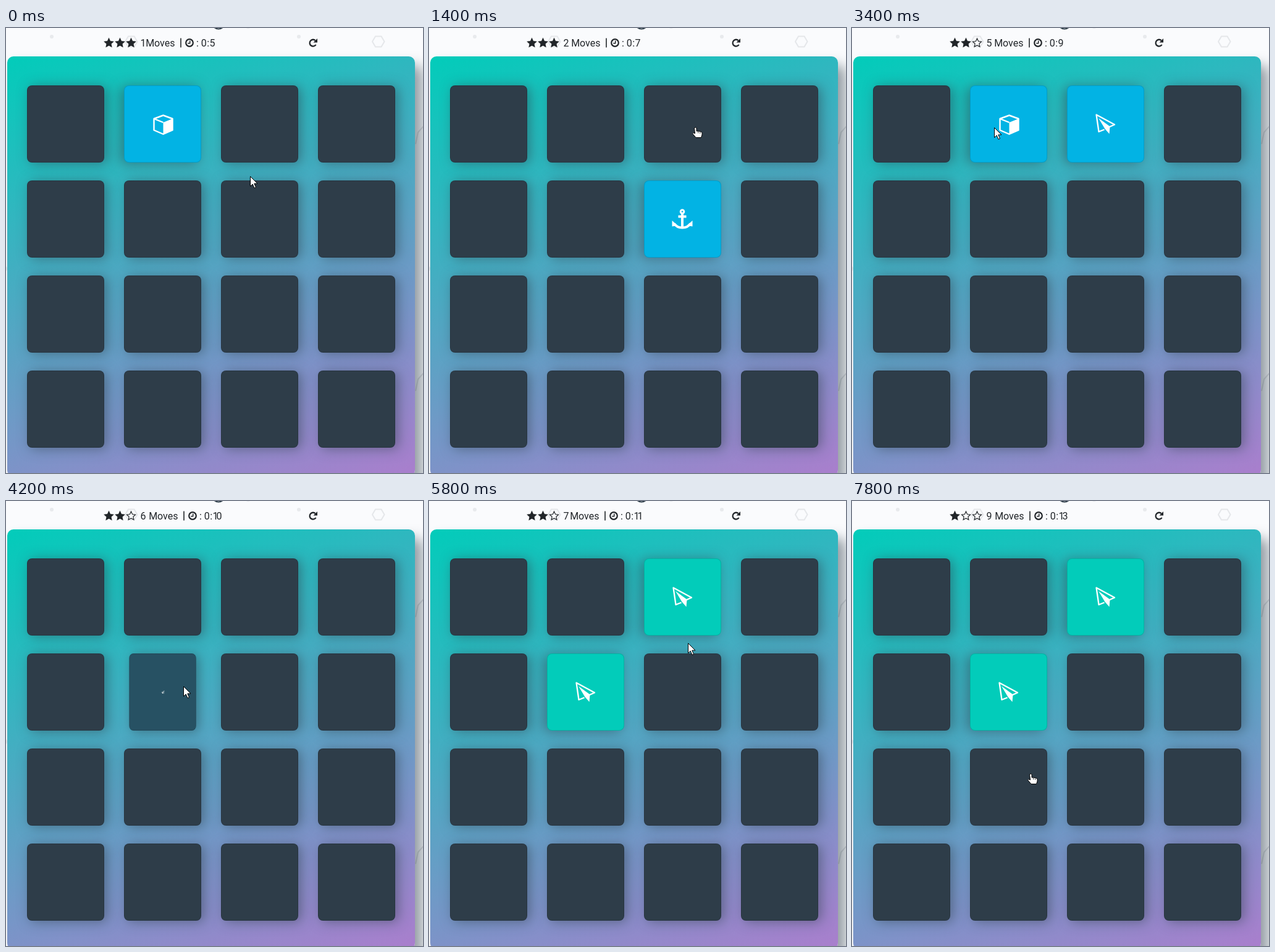
Recreate the animation shown at these times as an HTML page. Size 675 px wide and 721 px high, loop 8 s.

```html
<!DOCTYPE html>
<html lang="en">
<head>
<meta charset="utf-8">
<title>Memory game</title>
<style>
html, body { margin: 0; width: 100%; height: 100%; overflow: hidden; background: #fafbfd; }
body { position: relative; }
.layer { position: absolute; left: 0; top: 0; }
.deck {
  position: absolute; left: 2px; top: 46px; width: 660px; height: 680px; border-radius: 10px;
  background: linear-gradient(160deg, #02ccba 0%, #aa7ecd 100%);
  box-shadow: 12px 15px 20px 0 rgba(46, 61, 73, .5);
}
.card {
  position: absolute; width: 125px; height: 125px; box-sizing: border-box;
  display: flex; align-items: center; justify-content: center;
  border: 1px solid rgba(0, 0, 0, .125); border-radius: 8px; background: #2e3d49;
  box-shadow: 5px 2px 20px 0 rgba(46, 61, 73, .5);
}
.card svg { flex: none; overflow: visible; }
text { font: 16px Roboto, "Open Sans", sans-serif; fill: #212529; }
</style>
</head>
<body>
<svg class="layer" width="675" height="721" fill="none" stroke="#e5e7ea" stroke-width="2">
  <path id="hex" d="M593 22l5-8.5h9.500l5 8.500-5 8.500h-9.500z"/>
  <use href="#hex" x="-400"/>
  <g fill="#e8eaed" stroke="none">
    <circle cx="74" cy="14" r="3"/><circle cx="474" cy="14" r="3"/>
    <circle cx="392" cy="-3" r="4"/><circle cx="-3" cy="390" r="5"/>
  </g>
  <path d="M663 188L667 169 676 159M663 588L667 569 676 559" stroke="#dcdfe2"/>
  <path d="M337-1Q344 4 351-1" stroke="#2e3d49"/>
</svg>
<div class="deck" id="deck"></div>
<svg class="layer" width="675" height="721">
  <g id="header"></g>
  <path d="M500.800 20.300A5.400 5.400 0 1 0 501.600 27" fill="none" stroke="#212529" stroke-width="2.300"/>
  <path d="M504 17v6.500h-6.500z" fill="#212529"/>
  <g id="arrow" fill="#fff" stroke="#000" stroke-linejoin="round">
    <path d="M.5 .5V16.500L4.200 13 7 19.300 9.500 18.200 6.800 12H12z"/>
  </g>
  <g id="hand" fill="#fff" stroke="#000" stroke-linejoin="round">
    <path d="M-1.500 1Q.5-1 2 1V6Q9 6 11 8.500V12L9.500 16.500H1L-4.500 10Q-3.500 7.500-.5 10z"/>
    <path d="M4.800 7V9.500M7.800 7.500V10" stroke-width=".8"/>
  </g>
</svg>
<script>
const INK = '#212529', BLUE = '#02b3e4', TEAL = '#02ccba', DARK = '#2e3d49';
const $ = id => document.getElementById(id);

// Icons are seen mirrored once a card has turned over.
const cube = `<g transform="translate(-1.5 .5)"><path d="M0-15L15-9.500V9L0 15.500-15 9V-9.500z M0-3.500L15-9.500"
  fill="none" stroke="#fff" stroke-width="2.400" stroke-linejoin="round"/><path d="M-15-9.500L0-3.500V15.500L-15 9z"/></g>`;
const plane = `<path d="M-6 4.500L-15 .5 14.500-15.500 10.500 12 1.500 8.500" fill="none" stroke="#fff"
  stroke-width="2.300" stroke-linejoin="round"/><path d="M11-10L-7.500 3.500-6.500 15.500 .5 7.500z"/>`;
const anchor = `<g fill="none" stroke="#fff" stroke-width="4"><circle cy="-12.500" r="2.800" stroke-width="3"/>
  <path d="M0-9V14M-6.500-4.500H6.500M-13 7Q-9 13.500 0 13.500 9 13.500 13 7"/></g>
  <path d="M-16.500 2V11.500L-7.500 10zM16.500 2V11.500L7.500 10z"/>`;
const leaf = `<path d="M15.500-14C19-4 17 10 3 10-4 10-8 8-11 9-13 11-14 13-15 12-19 11-14 8-12 5-13-2-8-8 4-8.500 10-9 13-10 15.500-14z"/>
  <path d="M6-4.500Q-2-4-8 3" fill="none" stroke="${BLUE}" stroke-width="2.200" stroke-linecap="round"/>`;
const faces = { 1: cube, 2: plane, 4: leaf, 5: plane, 6: anchor };

const cards = Array.from({ length: 16 }, (_, i) => {
  const x = 32 + i % 4 * 157, y = 47 + (i >> 2) * 154;
  const el = document.createElement('div');
  el.className = 'card';
  el.style.left = x + 'px';
  el.style.top = y + 'px';
  el.innerHTML = `<svg width="36" height="36" viewBox="-18 -18 36 36" fill="#fff">${faces[i] || ''}</svg>`;
  $('deck').append(el);
  return { el, icon: el.firstChild, x: x + 2, y: y + 46 };
});

const STEP = 100, LOOP = 8000;
const up = [1 / 6, .4, 5 / 6, 1], down = [.7, .3, 0];

// [time, cards, how far open at each step]
const flips = [
  [0, [1], [1]], [700, [6], up], [1200, [1], down], [1600, [2, 6], down],
  [3400, [1, 2], [1]], [3800, [1, 2], down], [4200, [5], [1 / 6, ...up]],
  [5200, [2], up.slice(1)], [6300, [4], up], [7000, [6], up.slice(1)], [7300, [4, 6], [.4, 0]]
];
const matched = [2, 5], matchTime = 5400;

// [first step, last step, x, y]
const moves = [
  [100, 300, 424, 281], [1200, 1400, 431, 161], [2200, 2300, 230, 161], [3600, 4000, 287, 300],
  [4700, 5000, 389, 149], [5200, 5400, 424, 227], [5800, 5800, 419, 230], [5900, 6000, 159, 315],
  [6200, 6300, 110, 312], [6500, 6600, 335, 322], [6800, 6900, 382, 326], [7300, 7400, 380, 332],
  [7600, 7800, 289, 442]
];

// [time, moves, stars, seconds]
const scores = [
  [0, 1, 3, 5], [200, 1, 3, 6], [700, 2, 3, 6], [1200, 2, 3, 7], [1600, 3, 2, 7], [2200, 3, 2, 8],
  [3400, 5, 2, 9], [4200, 6, 2, 10], [5200, 7, 2, 11], [6300, 8, 2, 11], [7000, 9, 1, 12], [7300, 9, 1, 13]
];

function star(x, solid) {
  const points = Array.from({ length: 10 }, (_, i) => {
    const a = i * Math.PI / 5, r = (i % 2 ? .48 : 1) * 7.4;
    return [x + r * Math.sin(a), 24.4 - r * Math.cos(a)].map(v => v.toFixed(2));
  });
  return `<polygon points="${points.join(' ')}" fill="${solid ? INK : 'none'}" stroke="${INK}" stroke-width="1.2"/>`;
}

// The digit 1 is set narrower than the others.
function clockText(str, x) {
  const advance = { ':': 4.2, ' ': 3.6, 1: 6 };
  const xs = [...str].map(c => {
    const at = x;
    x += advance[c] || 9.5;
    return at;
  });
  return `<text y="30" xml:space="preserve" x="${xs.join(' ')}">${str}</text>`;
}

function header([, count, stars, seconds]) {
  const bar = { 1: 283, 7: 285, 6: 288, 8: 288, 9: 288 }[count] || 287;
  return [166.5, 184.5, 202.5].map((x, i) => star(x, i < stars)).join('') +
    `<text x="217.5" y="30">${count}</text><text x="${bar - 9.5}" y="30" text-anchor="end">Moves</text>
    <rect x="${bar - .8}" y="16.500" width="1.600" height="15" fill="${INK}"/>
    <g transform="translate(${bar + 14} 24)" fill="none" stroke="${INK}">
    <circle r="5.800" stroke-width="2.200"/><path d="M.7-3.500V.8H-2.800" stroke-width="1.500"/></g>` +
    clockText(': 0:' + seconds, bar + 25);
}

function pointer(t) {
  let x = 395, y = 240;
  for (const [from, to, tx, ty] of moves) {
    if (t < from) break;
    const k = Math.min(1, (t - from + STEP) / (to - from + STEP));
    x += (tx - x) * k;
    y += (ty - y) * k;
  }
  return [Math.round(x), Math.round(y)];
}

let shown = -1;

function draw(t) {
  const open = Array(16).fill(0);
  for (const [start, ids, steps] of flips) {
    if (t < start) continue;
    const p = steps[Math.min((t - start) / STEP, steps.length - 1)];
    ids.forEach(i => open[i] = p);
  }
  cards.forEach(({ el, icon }, i) => {
    const p = open[i], face = t >= matchTime && matched.includes(i) ? TEAL : BLUE;
    el.style.transform = `rotateY(${180 * p}deg)`;
    el.style.background = `color-mix(in srgb, ${face} ${100 * p}%, ${DARK})`;
    icon.style.transform = `scale(${p})`;
  });

  const [x, y] = pointer(t);
  const onCard = cards.some((c, i) => !open[i] && x >= c.x && x < c.x + 125 && y >= c.y && y < c.y + 125);
  for (const id of ['arrow', 'hand']) {
    $(id).setAttribute('transform', `translate(${x} ${y})`);
    $(id).style.display = (id === 'hand') === onCard ? '' : 'none';
  }
  $('header').innerHTML = header(scores.filter(s => s[0] <= t).pop());
}

function tick() {
  const t = Math.floor(performance.now() % LOOP / STEP) * STEP;
  if (t !== shown) draw(shown = t);
  requestAnimationFrame(tick);
}
tick();
</script>
</body>
</html>
```
